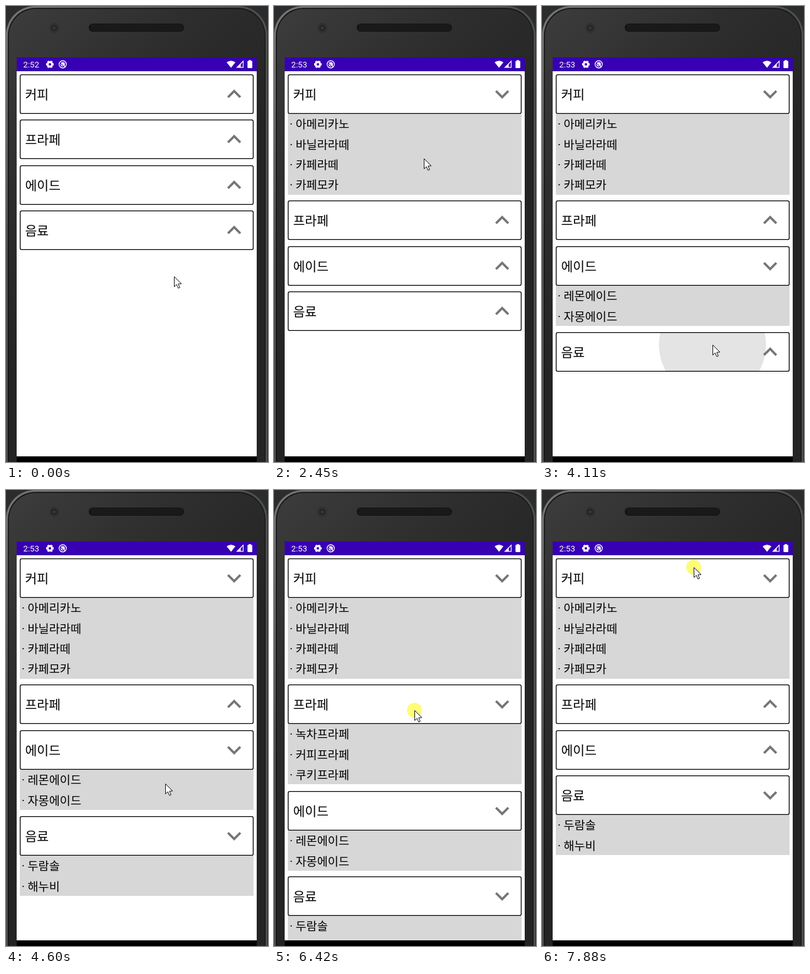
Recreate the animation shown at these times as an HTML page with a canvas. Size 418 by 727 pixels, loop 8 s.

```html
<!DOCTYPE html>
<html lang="ko">
<head>
<meta charset="utf-8">
<style>
  html, body { margin: 0; height: 100%; overflow: hidden; background: #2b2c2d; }
  canvas { display: block; }
</style>
</head>
<body>
<canvas id="stage" width="418" height="727"></canvas>
<script>
const ctx = document.getElementById('stage').getContext('2d');
const LOOP = 8000;
const KOREAN = '"Noto Sans CJK KR", "Noto Sans CJK", "Noto Sans KR", sans-serif';
const PITCH = 72.35, ROW = 32.27, CARD_H = 63, PURPLE = '#3700b3';

const menu = [
  { title: '커피', items: ['아메리카노', '바닐라라떼', '카페라떼', '카페모카'] },
  { title: '프라페', items: ['녹차프라페', '커피프라페', '쿠키프라페'] },
  { title: '에이드', items: ['레몬에이드', '자몽에이드'] },
  { title: '음료', items: ['두람솔', '해누비'] },
];

// [release time, card]; every click toggles its card
const clicks = [[2080, 0], [3110, 2], [4110, 3], [5140, 1], [6480, 1], [7270, 2], [8010, 0]];

// [start, end, x, y]: eased pointer moves, resting in between
const moves = [
  [430, 500, 270, 426], [690, 1200, 292, 300], [1200, 1780, 235, 155],
  [2170, 2930, 248, 439], [3340, 3780, 272, 540], [4400, 4880, 224, 351],
  [6690, 7110, 229, 411], [7400, 7840, 242, 123],
];

const clamp = v => Math.max(0, Math.min(1, v));
const ease = v => v * v * (3 - 2 * v);

function pointerAt(t) {
  let x = 268, y = 431;
  for (const [start, end, toX, toY] of moves) {
    const k = ease(clamp((t - start) / (end - start)));
    x += (toX - x) * k;
    y += (toY - y) * k;
  }
  return [Math.round(x), Math.round(y)];
}

const clickTimes = card => clicks.filter(c => c[1] === card).map(c => c[0]);

// 0 = closed, 1 = open; odd clicks on a card open it, even ones close it
const openness = (card, t, length) => clickTimes(card)
  .reduce((sum, at, i) => sum + (i % 2 ? -1 : 1) * clamp((t - at) / length), 0);

function roundBox(x, y, w, h, r, fill) {
  ctx.beginPath();
  ctx.roundRect(x, y, w, h, r);
  ctx.fillStyle = fill;
  ctx.fill();
}

function disc(x, y, r, color) {
  ctx.fillStyle = color;
  ctx.beginPath();
  ctx.arc(x, y, r, 0, 7);
  ctx.fill();
}

function shape(points, color) {
  ctx.fillStyle = color;
  ctx.beginPath();
  points.forEach(p => ctx.lineTo(...p));
  ctx.closePath();
  ctx.fill();
}

function line(x1, y1, x2, y2, width, color) {
  ctx.strokeStyle = color;
  ctx.lineWidth = width;
  ctx.beginPath();
  ctx.moveTo(x1, y1);
  ctx.lineTo(x2, y2);
  ctx.stroke();
}

function text(str, x, y, font, color = '#000') {
  ctx.font = font;
  ctx.fillStyle = color;
  ctx.fillText(str, x, y);
}

function gradient(x, y, ...colors) {
  const g = ctx.createLinearGradient(0, 0, x, y);
  colors.forEach((c, i) => g.addColorStop(i / (colors.length - 1), c));
  return g;
}

function clipped(x, y, w, h, draw) {
  ctx.save();
  ctx.beginPath();
  ctx.rect(x, y, w, h);
  ctx.clip();
  draw();
  ctx.restore();
}

function drawPhone() {
  ctx.fillStyle = '#2b2c2d';
  ctx.fillRect(0, 0, 418, 727);
  roundBox(0, 0, 417, 800, 46, gradient(200, 200, '#777', '#4c4d4d'));
  roundBox(3, 3, 411, 800, 44, '#121212');
  roundBox(4.5, 4.5, 408.5, 800, 43, gradient(300, 300, '#3d3d3d', '#2e2e2e', '#242424'));

  disc(77, 35, 8, '#303030');
  disc(77, 35, 5, '#262626');
  disc(77, 35, 2, '#3c3c3c');

  roundBox(132, 28, 152, 13, 6, '#151515');
  ctx.fillStyle = '#2f2f2f';
  for (let row = 0; row < 4; row++)
    for (let x = 136 + row % 2 * 1.5; x < 281; x += 3) ctx.fillRect(x, 30 + row * 2.6, 1.2, 1.2);

  ctx.fillStyle = '#000';
  ctx.fillRect(17, 82, 383, 645);
  ctx.fillStyle = '#fff';
  ctx.fillRect(17, 104, 383, 614);
}

function drawStatusBar(t) {
  ctx.fillStyle = PURPLE;
  ctx.fillRect(17, 82, 383, 22);
  text(t < 1100 ? '2:52' : '2:53', 27.5, 98, '13.2px Roboto, sans-serif', '#fff');

  // Gear
  for (let a = 0; a < 3; a += Math.PI / 3) {
    const dx = 6 * Math.cos(a), dy = 6 * Math.sin(a);
    line(70 - dx, 93 - dy, 70 + dx, 93 + dy, 3.6, '#fff');
  }
  disc(70, 93, 4.9, '#fff');
  disc(70, 93, 2, PURPLE);

  // Round notification icon
  disc(90.5, 93, 6.4, '#fff');
  disc(90.5, 93, 5.1, PURPLE);
  disc(90.5, 93, 3.4, '#fff');
  line(87, 91, 93, 97, 1.3, PURPLE);
  line(88, 90.5, 94.5, 97, 1.3, '#fff');

  // Wi-Fi, signal, battery
  ctx.beginPath();
  ctx.moveTo(359, 98.5);
  ctx.lineTo(352, 89.8);
  ctx.quadraticCurveTo(359, 84.5, 366, 89.8);
  ctx.fill();
  shape([[367, 98.5], [379, 86.5], [379, 98.5]], '#fff');
  shape([[374.5, 93], [377.8, 89.5], [377.8, 97.3], [374.5, 97.3]], PURPLE);
  roundBox(387.3, 86.3, 3.6, 3, 0, '#fff');
  roundBox(385.3, 87.6, 7.6, 11.4, 1, '#fff');
}

function drawChevron(y, turn) {
  ctx.save();
  ctx.translate(364, y);
  ctx.rotate(turn * Math.PI);
  ctx.scale(1.865, 1.865);
  shape([[0, -4], [-6, 2], [-4.59, 3.41], [0, -1.17], [4.59, 3.41], [6, 2]], '#757575');
  ctx.restore();
}

// The touch wave grows from the pointer, then fades
function drawRipple(card, y, t) {
  for (const at of clickTimes(card)) {
    const age = t - at + 40;
    if (age < 0 || age > 350) continue;
    const [x, tipY] = pointerAt(at);
    clipped(22, y, 373, CARD_H, () =>
      disc(x, Math.min(tipY, y + CARD_H), 30 + 230 * clamp(age / 170),
        `rgba(0,0,0,${0.106 * clamp((350 - age) / 65)})`));
  }
}

function drawPanel(items, y, height) {
  clipped(22, y, 373, height, () => {
    ctx.fillStyle = '#d7d7d7';
    ctx.fillRect(22, y, 373, height);
    items.forEach((item, i) => {
      const base = Math.round(y + 23.4 + i * ROW);
      text('·', 25, base, '18.6px Roboto, sans-serif');
      text(item, 34.5, base, '18.6px ' + KOREAN);
    });
  });
}

function drawMenu(t) {
  let top = 109;
  menu.forEach(({ title, items }, i) => {
    const y = Math.round(top);
    const height = items.length * ROW * openness(i, t, items.length * 35);
    // The panel itself trails the cards below it while it settles
    const lag = 2.5 * (openness(i, t, 310) % 1 > 0);
    if (height > 3) drawPanel(items, y + CARD_H, Math.floor(height) - lag);

    roundBox(22.6, y + 0.6, 371.8, CARD_H - 1.2, 2.5, '#fff');
    drawRipple(i, y, t);
    ctx.beginPath();
    ctx.roundRect(22.6, y + 0.6, 371.8, CARD_H - 1.2, 2.5);
    ctx.strokeStyle = '#000';
    ctx.lineWidth = 1.3;
    ctx.stroke();
    text(title, 30.5, y + 40, '20.5px ' + KOREAN);
    drawChevron(y + 31.5, openness(i, t, 200));
    top += PITCH + height;
  });
}

function drawPointer(t) {
  const [x, y] = pointerAt(t);
  if (clicks.some(([at]) => t >= at - 140 && t < at)) disc(x, y, 12, 'rgba(255,250,0,.52)');
  ctx.save();
  ctx.translate(x + 0.5, y + 0.5);
  shape([[0, 0], [0, 16], [3.7, 12.6], [6.3, 18.4], [8.8, 17.4], [6.3, 11.6], [11.4, 11.4]], '#fff');
  ctx.strokeStyle = '#111';
  ctx.lineWidth = 1;
  ctx.stroke();
  ctx.restore();
}

function frame(now) {
  const t = now % LOOP;
  drawPhone();
  drawStatusBar(t);
  clipped(17, 104, 383, 614, () => drawMenu(t));
  drawPointer(t);
  requestAnimationFrame(frame);
}
requestAnimationFrame(frame);
</script>
</body>
</html>
```
